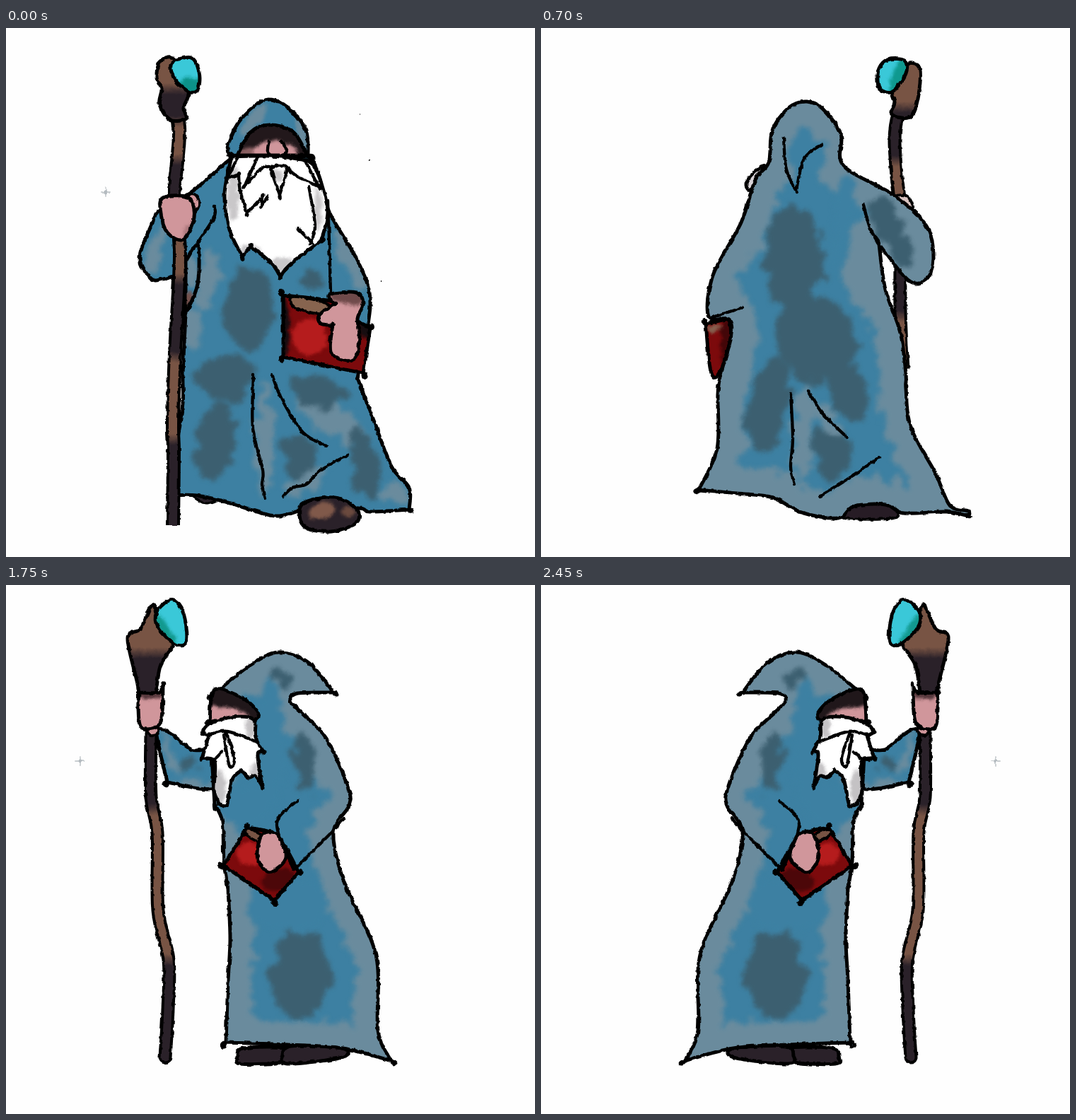
An HTML page for the animation above (2800 ms loop, 748 by 748 pixels).

```html
<!DOCTYPE html>
<html lang="en">
<head>
<meta charset="utf-8">
<title>Walking wizard</title>
<style>
html, body { margin: 0; width: 100%; height: 100%; overflow: hidden; background: #fefefe; }
svg { display: block; width: 100%; height: 100%; }
path { stroke-linecap: round; stroke-linejoin: round; }
</style>
</head>
<body>
<svg id="stage" viewBox="0 0 748 748"></svg>
<script>
const STEP = 350, INK = 5;
const MID = '#3d80a2', LIGHT = '#6a8b9d', DARK = '#3c5f70', PAPER = '#fefefe';
const BROWN = '#785444', COAL = '#2a2129', SKIN = '#d0969b', RED = '#7c0a0c';
let defs = '', clips = 0;

// "x,y x,y! ..." to points; a mark makes that point a corner.
const points = text => text.trim().split(/\s+/).flatMap(s => {
  const p = s.replace('!', '').split(',').map(Number);
  return s.endsWith('!') ? [p, p] : [p];
});
const shift = (pts, dy) => pts.map(([x, y]) => [x, y + dy]);
const mirror = (pts, axis) => pts.map(([x, y]) => [2 * axis - x, y]).reverse();

function curve(pts, closed) {
  const p = typeof pts === 'string' ? points(pts) : pts, n = p.length;
  const at = i => closed ? p[(i + n) % n] : p[Math.max(0, Math.min(n - 1, i))];
  let d = 'M' + p[0];
  for (let i = 0; i < (closed ? n : n - 1); i++) {
    const [a, b, c, e] = [at(i - 1), at(i), at(i + 1), at(i + 2)];
    const c1 = b.map((v, k) => (v + (c[k] - a[k]) / 6).toFixed(1));
    const c2 = c.map((v, k) => (v - (e[k] - b[k]) / 6).toFixed(1));
    d += `C${c1} ${c2} ${c}`;
  }
  return closed ? d + 'Z' : d;
}
const draw = (d, fill, w = INK, ink = '#000', more = '') =>
  `<path d="${d}" fill="${fill}" stroke="${ink}" stroke-width="${w}" ${more}/>`;
const shape = (pts, fill, w) => draw(curve(pts, true), fill, w);
const lines = (...list) => list.map(pts => draw(curve(pts), 'none', 4.3)).join('');

const blob = (color, x, y, rx, ry, tilt = 0) =>
  `<ellipse cx="${x}" cy="${y}" rx="${rx}" ry="${ry}" fill="${color}" transform="rotate(${tilt} ${x} ${y})"/>`;
const dark = (...at) => blob(DARK, ...at), light = (...at) => blob(LIGHT, ...at), mid = (...at) => blob(MID, ...at);

// Outlined area with brush spots inside and, if asked, a soft light rim.
function painted(pts, base, spots = '', rim = 0, brush = 'dab') {
  const d = curve(pts, true), id = 'clip' + clips++;
  defs += `<clipPath id="${id}"><path d="${d}"/></clipPath>`;
  const edge = rim ? draw(d, 'none', rim, LIGHT) : '';
  return `<path d="${d}" fill="${base}"/><g clip-path="url(#${id})"><g filter="url(#${brush})">${edge}${spots}</g></g>` +
    draw(d, 'none');
}
const cloth = (pts, spots, rim) => painted(pts, MID, spots, rim, 'brush');

const move = (dy, art, scale = 1) => `<g transform="translate(0 ${dy}) scale(1 ${scale})">${art}</g>`;
const flip = (axis, art) => `<g transform="translate(${2 * axis} 0) scale(-1 1)">${art}</g>`;
const dot = (x, y, s) => `<rect x="${x - s / 2}" y="${y - s / 2}" width="${s}" height="${s}"/>`;
const spark = (x, y) => draw(`M${x - 6} ${y}h12M${x} ${y - 6}v12`, 'none', 1.8, '#c9ced1') + blob('#b4bbc0', x, y, 2.4, 2.4);

// Bands of brown and black wood that swap softly at the given heights.
function wood(id, swaps) {
  const stops = swaps.map((y, i) => [BROWN, COAL].map((_, k) =>
    `<stop offset="${(y + 16 * k - 8) / 748}" stop-color="${(i + k) % 2 ? COAL : BROWN}"/>`).join('')).join('');
  defs += `<linearGradient id="${id}" gradientUnits="userSpaceOnUse" x1="0" y1="0" x2="0" y2="748">${stops}</linearGradient>`;
  return `url(#${id})`;
}
function staff(grain, pole, width, head, gem, facet, cap = 'butt') {
  const d = curve(pole), end = `style="stroke-linecap:${cap}"`;
  return draw(d, 'none', width, '#000', end) + draw(d, 'none', width - 8, grain, end) +
    shape(head, grain) + painted(gem, '#3ac8d8', facet);
}

// Front view
const frontStaff = staff(wood('frontWood', [86, 132, 186, 290, 355, 465, 582]),
  '236,100 245,140 242,190 238,240 246,320 239,460 236,560 237,600 236,703', 20,
  '218,47 213,70 220,86 217,108 232,130 255,128 251,113 258,88 238,44',
  '236,48 262,42 273,62 272,85 261,91 243,78 234,62', blob('#0c9289', 258, 84, 20, 13, -25));

const frontTop = points(`250,490 254,405! 256,345! 222,355 205,354 189,325 205,280 219,255 262,232 319,184
  372,150 427,182 442,208 457,260 495,325 514,375 511,425 498,490`);
const frontHem = points(`499,500 520,555 545,620 570,650 570,681! 515,684 498,679 425,681 380,690 318,672
  270,661 232,661! 240,600 250,530`);
const frontTopSpots = light(285, 355, 14, 45, 8) + light(262, 425, 14, 28) + light(487, 325, 12, 50, -22) +
  light(212, 312, 10, 38, 22) + dark(343, 395, 34, 60) + dark(432, 358, 19, 12);
const frontHemSpots = light(366, 580, 13, 85) + light(460, 555, 62, 20, 30) + light(425, 640, 40, 12, -30) +
  light(552, 658, 20, 14) + dark(308, 495, 42, 32) + dark(296, 585, 28, 56, 10) + dark(440, 515, 42, 24, 10) +
  dark(415, 605, 24, 32) + dark(508, 620, 18, 58, -12);
const frontBackFoot = shape('266,662 282,672 300,665', COAL, 3);
const frontHemLines = lines('350,490 349,565 363,625 362,645 366,666', '376,490 390,525 420,572 453,591',
  '483,604 445,625 425,645 405,650 392,662') +
  painted('415,690 422,671 465,664 496,680 495,700 460,712 425,707', COAL,
    blob('#80594a', 446, 683, 20, 10, -15) + blob('#6b4a3e', 484, 684, 8, 8));

const frontHead = painted('321,182 324,142 348,113 371,101 398,112 424,145 427,182!', MID,
    light(350, 130, 9, 28, 40) + light(418, 150, 6, 24, -15)) +
  painted('327,180! 345,148 372,137 406,147 426,180!', '#22181b', blob(SKIN, 380, 178, 32, 18) + blob('#8a6062', 340, 178, 12, 10)) +
  lines('372,160 370,174 378,182 390,181 397,173 389,160') +
  painted(`319,182! 309,235 316,285 334,323! 347,309! 378,335 388,352! 400,336 446,300! 455,260 446,220 438,200
    425,188 375,181`, '#fff', ['321,235,9,38', '345,317,18,9', '392,336,22,10', '384,208,8,9', '441,255,6,30']
    .map(at => blob('#c9c7c9', ...at.split(','))).join('')) +
  lines('328,182 313,213! 329,207! 331,230 341,262! 362,239! 361,252! 370,238',
    '355,184 338,222! 364,197 378,196', '374,199 387,236! 397,200 386,194 374,199',
    '398,198 412,210 442,224! 424,190', '428,224 437,280 430,305', '412,283 433,304');

const frontBook = painted('392,378! 458,386 475,402 515,424! 505,488! 440,475 392,465!', RED,
    blob('#b51c1d', 430, 437, 24, 26) + blob('#160d10', 390, 425, 11, 50) + blob('#160d10', 510, 420, 12, 18)) +
  shape('405,380 450,388 458,402 440,404 408,395', '#87644f', 4) +
  painted('457,377 495,374 505,390 497,411 500,435 495,465 478,470 459,457 462,420! 445,418 443,406 464,390!', SKIN,
    blob('#6f4a4a', 482, 380, 26, 10, 10));

const frontArms = lines('294,252 294,268 265,312', '455,245 457,300 459,374') + frontBook + frontHead;
const gap = (fill, spots) => painted('254,330! 271,308 271,362 254,404!', fill, spots);
const frontHand = shape('258,238 268,236 273,250 261,267', SKIN, 4) +
  painted('222,240 258,240 266,268 250,299 228,289 219,262', SKIN, blob('#a9757a', 260, 288, 8, 14, 30));

// Back view
const backStaff = staff(wood('backWood', [112, 188, 242, 408]),
  '511,110 503,130 500,160 503,210 508,260 508,400 512,482', 19,
  '514,56 525,49 536,60 533,100 522,126 496,122 500,105 497,88',
  '476,75 478,57 490,45 514,46 516,64 497,90 480,87', blob('#0f998f', 507, 66, 10, 32, 20)) +
  shape('503,238 518,238 526,254 512,252', '#d9c3c0', 4);

const backTop = points(`254,490 268,440 266,412 237,408 243,350 283,275 303,215 322,190 327,145 350,113 375,104
  398,114 424,150 428,195 500,237 545,280 555,325 545,355 520,357 478,306! 487,370 508,430 516,490`);
const backHem = points(`518,520 519,595 545,653! 490,658 440,664 400,685 348,693 325,676 280,674 255,686 195,684
  164,690! 164,683 190,675 210,630 245,565 252,510`);
const backTopSpots = mid(375, 175, 26, 32) + mid(425, 270, 14, 70, 10) + light(450, 340, 18, 60) +
  dark(358, 325, 42, 75) + dark(388, 440, 58, 62, -12) + dark(496, 288, 20, 56, -25);
const backHemSpots = dark(335, 515, 30, 40, 15) + dark(356, 600, 27, 40) + dark(446, 535, 28, 65, -10) +
  light(398, 570, 14, 70) + light(372, 545, 10, 42, 42);
const backFoot = shape('266,692 280,670 325,670 343,692', '#271c25', 4);
const backHemLines = lines('390,513 370,545 335,579', '415,517 412,580 415,620 410,645', '290,607 330,635 373,662');
const backTopLines = lines('343,155 347,200 362,233', '398,164 372,185 361,230', '456,250 465,282 478,306', '240,410 285,395');
const backBook = shape('290,222 298,208 316,195 298,228', '#d9d4d8') +
  painted('233,418! 266,411! 268,440 252,489 240,485', RED, blob('#430608', 262, 450, 8, 40) + blob('#85604f', 245, 424, 12, 6, -15));
const backRobe = (hem, turn) => backStaff + backBook + turn(backFoot) +
  cloth(backTop.concat(hem), backTopSpots + turn(backHemSpots), 76) + backTopLines + turn(backHemLines);

// Side view, facing right
const sideStaff = staff(wood('sideWood', [96, 318, 530]),
  '543,208 543,300 534,350 533,460 518,530 519,600 523,668', 19,
  '535,38 542,29 558,62 576,75 562,140 558,170 540,170 530,115 511,82 530,62',
  '493,80 495,48 504,27 516,21 535,38 533,60 508,84', blob('#12998f', 523, 68, 9, 32, 32), 'round');
const sideHand = shape('532,207 538,196 551,200 543,213', SKIN, 4) +
  painted('526,143! 533,152 560,152! 561,175 556,202 530,195', SKIN, blob('#54363a', 545, 155, 16, 7));
const sideArm = cloth('452,236 485,233 512,212 527,204 535,212 520,279! 452,287',
  light(518, 235, 8, 34, 15) + light(480, 284, 34, 7) + dark(492, 258, 11, 9));
const sideHood = points('453,310! 459,200 458,158! 405,115 362,95 320,110 285,152! 335,153 346,163 330,181');
const sideFace = painted('395,190 400,170 430,152 455,150 460,192!', '#20171a', blob(SKIN, 436, 186, 32, 14, -8)) +
  painted(`398,190 430,187 463,198 470,209! 461,213! 471,245! 453,250 454,290 447,308! 436,311 428,275 415,262!
    405,272 395,270 386,284! 392,240 384,236! 395,215`, '#fff',
    blob('#c4c2c4', 401, 200, 9, 16) + blob('#c4c2c4', 447, 285, 9, 26) + blob('#c4c2c4', 395, 265, 7, 13)) +
  lines('393,222 435,207 462,212', '437,208 425,245 432,256 440,212', '442,235 452,245 464,247');
const sideBook = (outline, x, y) => painted(outline, RED, blob('#b51c1d', x, y, 20, 16) + blob('#4c0709', x - 40, y + 37, 24, 14, 20));

const standing = shape('350,655 412,655 421,667 416,677 355,674', COAL) +
  shape('273,655 345,652 357,665 350,677 273,668', COAL) +
  cloth(sideHood.concat(points(`295,217 265,285 263,312 285,350 270,420 225,523 222,630 203,673! 272,655 350,650
    437,647! 434,560 431,500 434,430! 440,390 442,335`)),
    mid(375, 230, 20, 100) + mid(410, 315, 35, 35) + mid(350, 450, 55, 40) + dark(358, 130, 14, 12) +
    dark(324, 252, 15, 44, 10) + dark(333, 550, 42, 62), 66) + sideFace +
  sideBook('334,406! 369,446! 440,397! 407,343! 365,355', 403, 380) + shape('385,354 405,345 410,352 390,363', BROWN, 4) +
  shape('352,385 364,353 385,352 393,380 385,400 372,405', SKIN) +
  lines('336,305 361,327 363,350 341,403', '270,330 285,347 341,403');

const striding = shape('222,685 235,672 280,663 275,677', COAL) +
  shape('348,672 370,660 453,660 455,676 430,681 360,679', COAL) +
  cloth(shift(sideHood, 3).concat(points(`300,222 268,240 245,268 219,292 240,337 232,415 190,540 180,635 148,683!
    195,689 250,676 320,664 390,658 453,649! 442,575 433,520 435,470 420,410 424,370 447,330`)),
    light(400, 430, 13, 38) + light(300, 600, 12, 75, 20) + dark(338, 243, 17, 45, 22) + dark(388, 340, 24, 28, 15) +
    dark(258, 550, 27, 82, 25) + dark(362, 568, 38, 52, 15) + dark(368, 142, 18, 10), 36) + move(3, sideFace) +
  sideBook('262,395! 285,431! 320,418 360,389! 340,343! 318,349', 340, 378) +
  painted('310,350 324,353 326,384 312,401 289,398 300,370', SKIN, blob('#4d3538', 315, 358, 13, 12)) +
  lines('278,266 285,290 306,328 302,355 280,400', '240,335 260,382 280,400',
    '374,471 325,525 295,605 280,635 255,655', '316,536 312,570 314,617', '183,664 210,655 232,641');

const same = art => art;
const sideStand = sideStaff + sideArm + standing + sideHand + spark(643, 249);
const sideStride = move(3, sideStaff, .9955) + move(3, sideArm) + striding + move(3, sideHand) + dot(55, 188, 5) + dot(651, 138, 4);

const poses = [
  frontBackFoot + cloth(frontTop.concat(frontHem), frontTopSpots + frontHemSpots) + frontHemLines +
    gap(MID, light(262, 345, 9, 22) + blob('#74514c', 258, 386, 9, 12)) + frontArms + frontStaff + frontHand +
    spark(141, 232) + dot(501, 122, 1.5) + dot(515, 187, 2) + dot(530, 358, 2),
  flip(374, frontBackFoot) + cloth(shift(frontTop, 2.5).concat(mirror(frontHem, 374)), frontTopSpots + flip(374, frontHemSpots)) +
    flip(374, frontHemLines) + move(2.5, gap(PAPER) + frontArms) + move(4, frontStaff, .991) + move(2.5, frontHand),
  backRobe(mirror(backHem, 384), art => flip(384, art)),
  backRobe(backHem, same) + spark(698, 306) + dot(536, 678, 2),
  flip(374, sideStride),
  flip(374, sideStand),
  sideStride,
  sideStand
];

// Seeded noise roughens brush spots and gives the ink its shaky edge.
const noise = (id, freq, scale, blur) =>
  `<filter id="${id}" filterUnits="userSpaceOnUse" x="0" y="0" width="748" height="748" color-interpolation-filters="sRGB">
   <feTurbulence type="fractalNoise" baseFrequency="${freq}" numOctaves="2" seed="4" result="n"/>
   <feDisplacementMap in="SourceGraphic" in2="n" scale="${scale}" xChannelSelector="R" yChannelSelector="G"/>
   ${blur ? `<feGaussianBlur stdDeviation="${blur}"/>` : ''}</filter>`;
defs += noise('brush', .05, 32, 3) + noise('dab', .09, 10, 2) + noise('ink', .13, 4, 0);

const stage = document.getElementById('stage');
stage.innerHTML = `<defs>${defs}</defs>` +
  poses.map(art => `<g class="pose" filter="url(#ink)" display="none">${art}</g>`).join('');
const groups = [...stage.querySelectorAll('.pose')];
const start = performance.now();
let shown = -1;
function tick() {
  const now = Math.floor((performance.now() - start) / STEP) % groups.length;
  if (now !== shown) {
    groups.forEach((g, i) => g.setAttribute('display', i === now ? 'inline' : 'none'));
    shown = now;
  }
  requestAnimationFrame(tick);
}
tick();
</script>
</body>
</html>
```
